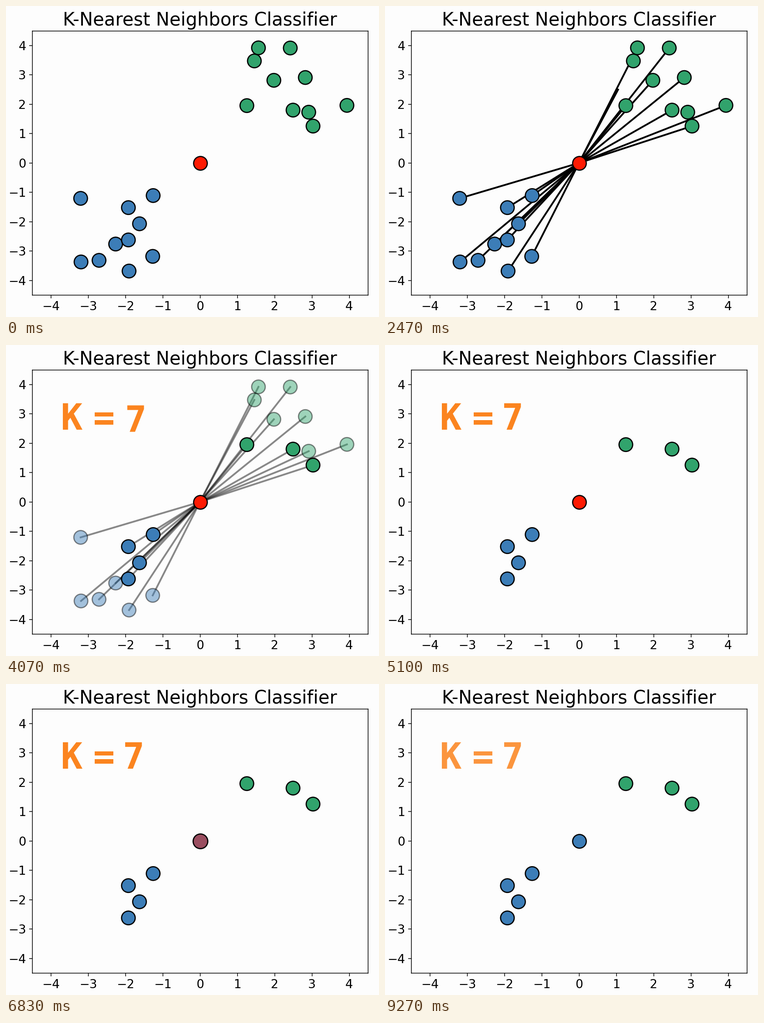
A matplotlib script that plays this animation: 820x683 px, repeating every 9310 ms.

```python
import numpy as np
import matplotlib.pyplot as plt
from matplotlib.animation import FuncAnimation
from matplotlib.patches import PathPatch
from matplotlib.textpath import TextPath
from matplotlib.transforms import Affine2D

W, H, DPI = 820, 683, 128
PX = 72 / DPI  # points per pixel
FRAMES, STEP = 266, 35

PAPER = "#fdfdfd"
BLUE, GREEN, ORANGE = "#3c7db7", "#31a36c", "#fb841f"
RED_RGB = np.array([254, 27, 3]) / 255
BLUE_RGB = np.array([60, 125, 183]) / 255
K = 7

# Listed in the order in which their lines are drawn
points = np.array([
    (-3.20, -1.205), (3.03, 1.256), (2.494, 1.800), (-1.92, -1.52),
    (-2.262, -2.76), (1.567, 3.92), (-1.256, -1.109), (3.939, 1.961),
    (-3.19, -3.37), (1.256, 1.953), (-1.902, -3.68), (1.98, 2.815),
    (-1.622, -2.07), (2.42, 3.915), (-2.707, -3.315), (2.823, 2.91),
    (-1.268, -3.18), (-1.92, -2.62), (1.457, 3.475), (2.915, 1.729),
])
colors = np.where(points[:, 0] > 0, GREEN, BLUE)
rank = np.argsort(np.hypot(*points.T))
near, far = rank[:K], rank[K:]


def ramp(t, start, end):
    return min(max((t - start) / (end - start), 0), 1)


def dots(xy, color, z):
    return ax.scatter(*xy.T, s=(30 * PX) ** 2, c=color, edgecolors="black",
                      linewidths=2.6 * PX, zorder=z)


def glyph(char):
    path = TextPath((0, 0), char, size=79.6,
                    prop={"family": "DejaVu Sans Mono", "weight": "bold"})
    left = path.get_extents().x0
    patch = PathPatch(path.transformed(Affine2D().translate(-left, 0)),
                      facecolor=ORANGE, linewidth=0, zorder=6)
    fig.add_artist(patch)
    return patch


def place(patch, x, y):
    patch.set_transform(Affine2D().translate(x, H - y))


plt.rcParams["font.family"] = "DejaVu Sans"
fig = plt.figure(figsize=(W / DPI, H / DPI), dpi=DPI, facecolor=PAPER)
ax = fig.add_axes([57.5 / W, 48 / H, 738 / W, 580.5 / H], facecolor=PAPER)
ax.set(xlim=(-4.5, 4.5), ylim=(-4.5, 4.5),
       xticks=range(-4, 5), yticks=range(-4, 5))
ax.set_title("K-Nearest Neighbors Classifier", fontsize=39.85 * PX,
             pad=11.4 * PX)
ax.tick_params(labelsize=26.57 * PX, length=6.6 * PX, width=1.5 * PX,
               pad=6.6 * PX)
for spine in ax.spines.values():
    spine.set_linewidth(1.5 * PX)

lines = [ax.plot([], [], color="black", lw=3.9 * PX, zorder=2)[0]
         for _ in points]
far_dots = dots(points[far], colors[far], 3)
near_dots = dots(points[near], colors[near], 4)
query = dots(np.zeros((1, 2)), [RED_RGB], 5)

letter, equals, digit = (glyph(c) for c in f"K={K}")
place(letter, 125, 186)
place(equals, 195, 186)


def update(i):
    t = (i + 0.5) * STEP

    # Lines shoot out one after another, then fade with the far points
    alpha = 1 - ramp(t, 3000, 5000)
    for n, (line, (x, y)) in enumerate(zip(lines, points)):
        start = 970 + 80 * n
        grow = ramp(t, start, start + 80)
        line.set_data([0, x * grow], [0, y * grow])
        line.set_alpha(alpha)
        line.set_visible(grow > 0 and alpha > 0)
    far_dots.set_alpha(alpha)

    # Label fades in, the digit slides to its place
    out = 1 - 0.9 * ramp(t, 9100, 10100)
    for patch in (letter, equals):
        patch.set_alpha(ramp(t, 3000, 3400) * out)
    digit.set_alpha(ramp(t, 3400, 3700) * out)
    slide = 60 * (1 - ramp(t, 3400, 4580)) ** 3
    place(digit, 262 + slide, 186 + slide)

    # The query point takes the majority class
    mix = ramp(t, 6300, 7350)
    query.set_facecolor([RED_RGB + (BLUE_RGB - RED_RGB) * mix])
    query.set_sizes([((30 + 2.2 * np.sin(np.pi * mix)) * PX) ** 2])
    return []


anim = FuncAnimation(fig, update, frames=FRAMES, interval=STEP,
                     repeat=True, repeat_delay=0, init_func=lambda: [])
plt.show()
```
